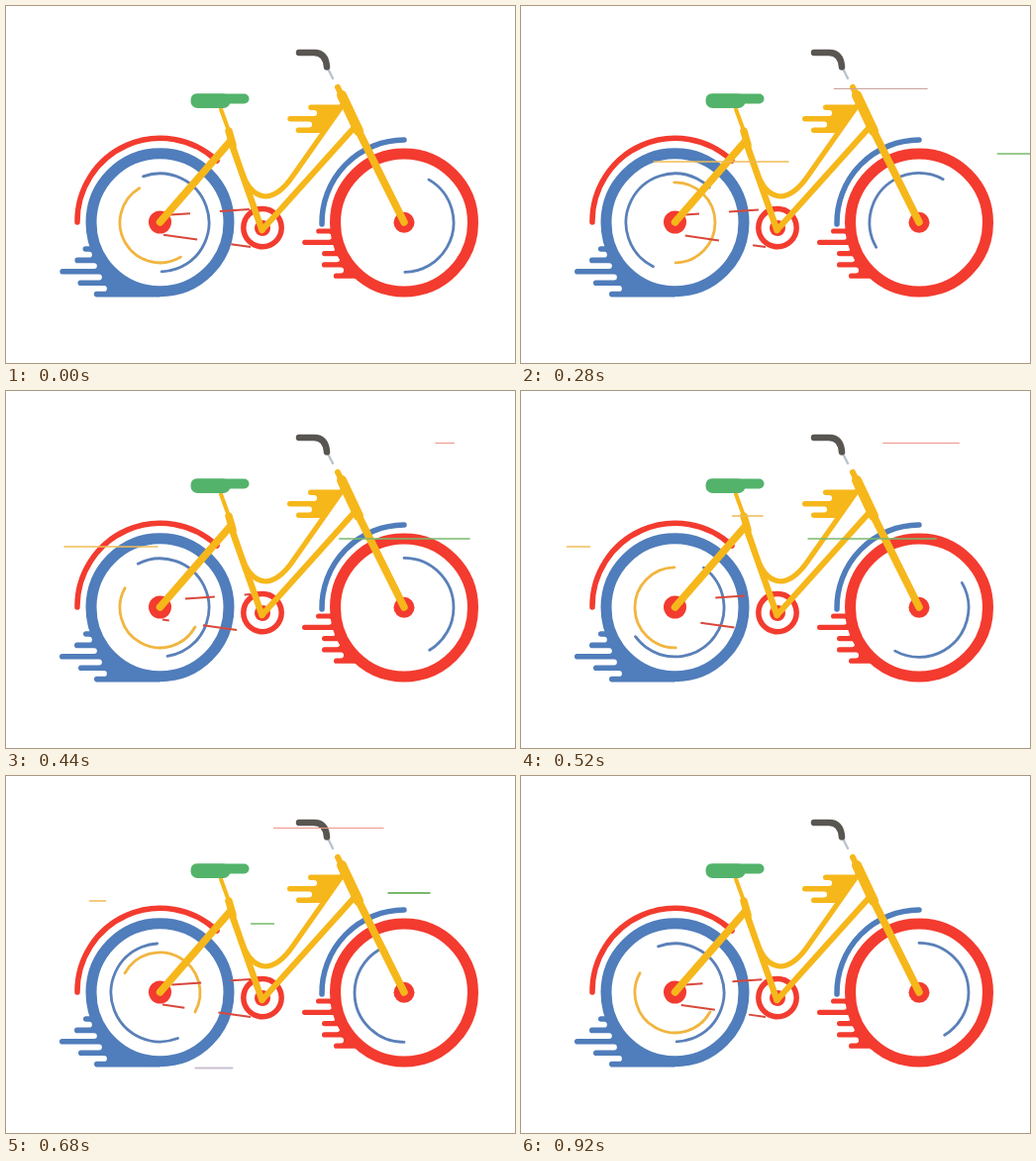
An HTML page that plays this animation: 514 px wide and 360 px high, repeating every 0.96 s.

```html
<!DOCTYPE html>
<html lang="en">
<head>
<meta charset="utf-8">
<title>Bicycle</title>
<style>
  html, body { margin: 0; width: 100%; height: 100%; overflow: hidden; background: #fff; }
  svg { display: block; width: 514px; height: 360px; }
  .line { fill: none; stroke-linecap: round; stroke-linejoin: round; }
  .blue { stroke: #507dbb; }
  .red { stroke: #f33b2f; }
  .gold { stroke: #f6b71b; }
  .blue-fill { fill: #507dbb; }
  .red-fill { fill: #f33b2f; }
  .gold-fill { fill: #f6b71b; }
  .chain { fill: none; stroke: #d9483b; stroke-width: 2; }
</style>
</head>
<body>
<svg viewBox="0 0 514 360">
  <!-- fenders -->
  <path class="line red" stroke-width="5.5" d="M72 218A83.7 83.7 0 0 1 213 156"/>
  <path class="line blue" stroke-width="5.5" d="M319 220A83.5 83.5 0 0 1 402 135"/>

  <!-- wheels -->
  <g id="smears"></g>
  <circle class="line blue" cx="155.500" cy="218.300" r="69.500" stroke-width="11"/>
  <circle class="line red" cx="402" cy="218.500" r="69.500" stroke-width="11"/>
  <g id="arcs"></g>
  <circle class="red-fill" cx="155.500" cy="218" r="11.500"/>
  <circle class="red-fill" cx="402" cy="218.300" r="10.500"/>

  <!-- drive -->
  <path id="upper" class="chain" stroke-dasharray="30" d="M166 210.500L247 205"/>
  <path id="lower" class="chain" stroke-dasharray="34.500" d="M158 230.500L247 243"/>
  <circle class="line red" cx="259" cy="223.600" r="19.200" stroke-width="5.500"/>
  <circle class="red-fill" cx="259" cy="224" r="8"/>

  <!-- frame -->
  <path class="line gold" stroke-width="7.500" d="M155.500 218L226 137"/>
  <path class="line gold" stroke-width="4" d="M217 104L225 126"/>
  <path class="line gold" stroke-width="7.500" d="M225 126L229 140"/>
  <path class="line gold" stroke-width="6.500" d="M227 137L258.500 226"/>
  <path class="line gold" stroke-width="5.200" d="M229 140L238 168Q247 191.500 262 192Q276 191.500 290 171L342 97"/>
  <path class="line gold" stroke-width="6" d="M258.500 226L353 121"/>
  <path class="line gold" stroke-width="6" d="M335 82L402 218"/>
  <path class="line gold" stroke-width="10" d="M339 90L356 126"/>
  <path class="line gold" stroke-width="7.500" d="M357 128L402 218"/>

  <!-- saddle and handlebar -->
  <g fill="#53b36b">
    <rect x="187" y="88.500" width="58.500" height="10" rx="5"/>
    <rect x="186.500" y="88.500" width="40" height="14.500" rx="7"/>
  </g>
  <path class="line" stroke="#b9c3cf" stroke-width="2.400" d="M326 65L330 73"/>
  <path class="line" stroke="#595652" stroke-width="6.500" d="M296 47H311Q323 47 324 61.500"/>

  <g id="wind"></g>
</svg>
<script>
const LOOP = 960, STEP = 40;
const $ = id => document.getElementById(id);

function add(parent, tag, attrs) {
  const el = document.createElementNS('http://www.w3.org/2000/svg', tag);
  for (const k in attrs) el.setAttribute(k, attrs[k]);
  return $(parent).appendChild(el);
}

// Comb-shaped smears: round teeth on the left, closed against a wheel or tube by `back`.
const smears = [
  { color: 'blue', tips: [78, 69, 54, 73, 89], y: 245, pitch: 11.4, width: 5.6,
    root: 84, slope: 5, amp: 11, turn: 1.7, phase: -0.9,
    back: 'H155V288A70 70 0 0 1 89 242Z' },
  { color: 'red', tips: [313, 299, 319, 319, 331], y: 227, pitch: 11.3, width: 5.2,
    root: 326, slope: 4, amp: 4, turn: 0.7, phase: 1.57,
    back: 'H358L361 274A70 70 0 0 1 333 224.5Z' },
  { color: 'gold', tips: [305, 284, 293], y: 102.3, pitch: 11.5, width: 5.4,
    root: 311, slope: -5, amp: 8, turn: 1.7, phase: 0.6,
    back: 'H318L340 99.6Z' }
];
for (const s of smears) s.el = add('smears', 'path', { class: s.color + '-fill' });

function comb(s, t) {
  const pulse = Math.exp(-(((t - 120) / 70) ** 2));
  const r = s.width / 2, gap = (s.pitch - s.width) / 2;
  let d = `M${s.root + 9} ${s.y - r}`;
  s.tips.forEach((tip, i) => {
    const x = tip + r + s.amp * pulse * Math.sin(s.turn * i + s.phase);
    if (i) d += `H${s.root + s.slope * (i - 1)}a${gap} ${gap} 0 0 1 0 ${2 * gap}`;
    d += `H${x}a${r} ${r} 0 0 0 0 ${2 * r}`;
  });
  return d + s.back;
}

// Reflections running round the wheels: two turns per loop.
const arcs = [
  { x: 155.5, r: 49.5, color: '#5a80b8', len: 198,
    angle: t => 250 + 720 * t / 920 + 9 * Math.sin(Math.PI * t / 920) },
  { x: 155.5, r: 40.5, color: '#f1b53f', len: 180, angle: t => 59 + 0.75 * t },
  { x: 402, r: 50, color: '#5a80b8', len: 149, angle: t => 0.75 * t - 60 }
];
for (const a of arcs) a.el = add('arcs', 'circle', {
  class: 'line', cx: a.x, cy: 218.4, r: a.r, stroke: a.color, 'stroke-width': 2.8,
  pathLength: 360, 'stroke-dasharray': `${a.len} ${360 - a.len}`
});

// Wind lines fly left: the head eases out, the tail eases in.
function gust(y, from, to, start, end, color, width) {
  const el = add('wind', 'path', { class: 'line', stroke: color, 'stroke-width': width });
  return t => {
    const p = (t - start) / (end - start);
    const head = from + (to - from) * (1 - (1 - p) ** 2);
    const tail = from + (to - from) * p * p;
    el.setAttribute('d', p > 0 && p < 1 ? `M${head} ${y}H${tail}` : '');
  };
}
const wind = [
  gust(83.5, 520, 296, 0, 400, '#cba19c', 1),
  gust(157, 322, 46, 80, 540, '#f0bd55', 1.6),
  gust(149, 516, 247, 250, 700, '#79b96b', 1.6),
  gust(52.5, 453, 228, 420, 880, '#f0948a', 1.2),
  gust(126, 246, 84, 500, 690, '#eebb58', 1.6),
  gust(118, 432, 282, 640, 880, '#79b96b', 1.8),
  gust(294.5, 244, 170, 320, 400, '#d0d7e0', 2.2),
  gust(294.5, 247, 173, 640, 720, '#c9c1d0', 2.2)
];

function draw(t) {
  for (const s of smears) s.el.setAttribute('d', comb(s, t));
  for (const a of arcs) a.el.setAttribute('transform', `rotate(${a.angle(t)} ${a.x} 218.4)`);
  $('upper').setAttribute('stroke-dashoffset', -(50 + 0.193 * t));
  $('lower').setAttribute('stroke-dashoffset', -(70 - 0.222 * t));
  for (const blow of wind) blow(t);
}

const start = performance.now();
function tick() {
  const t = (performance.now() - start) % LOOP;
  draw(Math.floor(t / STEP) * STEP);
  requestAnimationFrame(tick);
}
tick();
</script>
</body>
</html>
```
